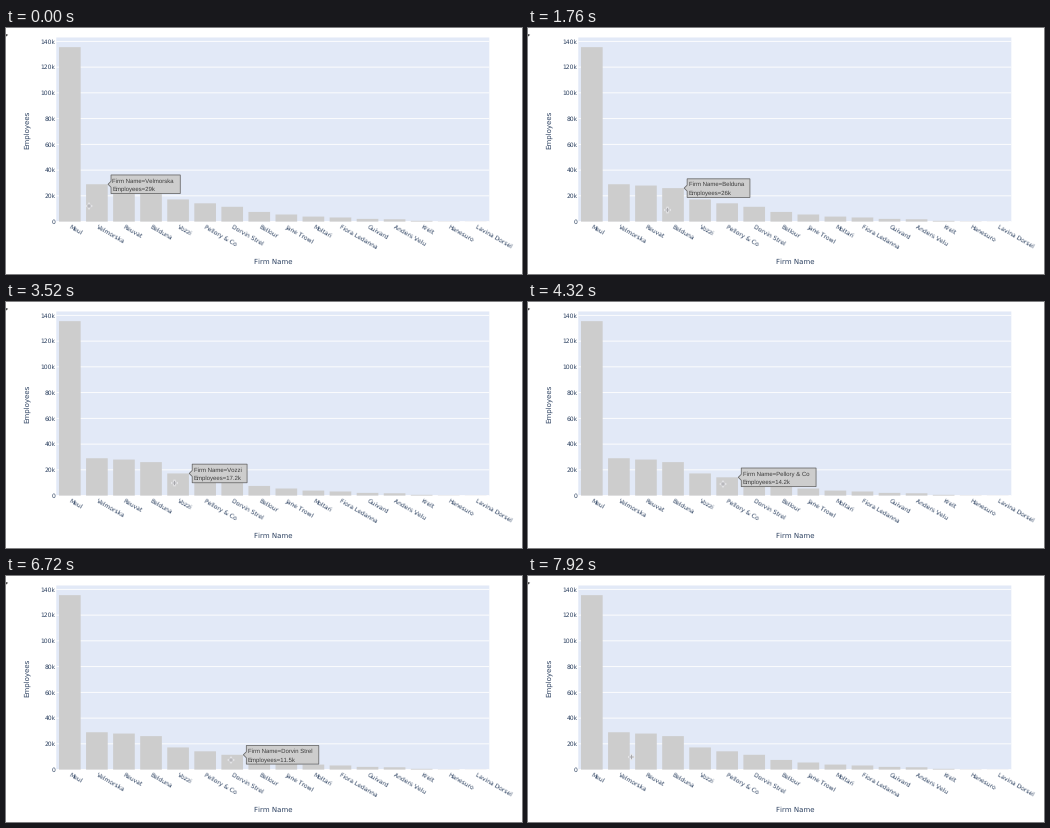
A matplotlib script that plays this animation: 516 by 246 pixels, repeating every 8 s.

```python
import matplotlib.pyplot as plt
from matplotlib.animation import FuncAnimation
from matplotlib.patches import Polygon, Rectangle
from matplotlib.textpath import TextPath

plt.rcParams["text.hinting"] = "none"
plt.rcParams["text.hinting_factor"] = 1

W, H, DPI = 516, 246, 100
FRAMES, STEP = 100, 80
PX = 72 / DPI
LEFT, RIGHT, TOP, BASE = 50.3, 483.3, 9.5, 193.6
PER_K = 25.75 / 20
INK, GREY = "#2a3f5f", "#cdcdcd"

FIRMS = [
    ("Meul", 135.5), ("Velmorska", 29), ("Reuvat", 28), ("Belduna", 26),
    ("Vozzi", 17.2), ("Pellory & Co", 14.2), ("Dorvin Strel", 11.5),
    ("Bellour", 7.5), ("Jane Trowl", 5.5), ("Moltari", 3.9),
    ("Fiora Ledanna", 3.2), ("Guivard", 2.1), ("Anders Velu", 1.8),
    ("Krelt", 0.6), ("Hanesuro", 0.2), ("Lavina Dorsel", 0.1),
]
SLOT = (RIGHT - LEFT) / len(FIRMS)
BAR = 0.8 * SLOT

# Pointer stops: time in ms, x, y
STOPS = [
    (0, 83, 178), (320, 90, 181), (400, 90, 181), (800, 114.5, 180),
    (880, 114.5, 180), (1040, 117.3, 180), (1280, 117.3, 180),
    (1760, 139.5, 182), (1920, 139.5, 182), (2480, 160, 180.5),
    (2640, 168.5, 181), (3840, 168.5, 181), (4320, 195, 182),
    (5440, 195, 182), (5680, 212, 182), (6080, 225, 184),
    (7200, 225, 184), (7920, 103.5, 181),
]

fig = plt.figure(figsize=(W / DPI, H / DPI), dpi=DPI, facecolor="white")
ax = fig.add_axes([0, 0, 1, 1])
ax.set_xlim(0, W)
ax.set_ylim(H, 0)
ax.axis("off")


def label(x, y, text, size, color=INK, family="DejaVu Sans", **kw):
    return ax.text(x, y, text, fontsize=size * PX, color=color,
                   family=family, va="baseline", **kw)


def box(x, y, w, h, color, zorder):
    ax.add_patch(Rectangle((x, y), w, h, fc=color, lw=0, zorder=zorder,
                           snap=False))


def stroke(xs, ys, color, width, **kw):
    return ax.plot(xs, ys, color=color, lw=width * PX, snap=False,
                   solid_capstyle="butt", **kw)[0]


def text_width(text, size):
    path = TextPath((0, 0), text, size=size, prop={"family": "Liberation Sans"})
    return path.get_extents().x1


def bar_left(i):
    return LEFT + SLOT * i + (SLOT - BAR) / 2


def draw_chart():
    box(LEFT, TOP, RIGHT - LEFT, BASE - TOP, "#e2e9f7", 0)
    for k in range(0, 141, 20):
        y = BASE - k * PER_K
        stroke([LEFT, RIGHT], [y, y], "white", 0.9, zorder=1)
        label(49.6, y + 2.2, f"{k}k" if k else "0", 6, ha="right")
    for i, (name, value) in enumerate(FIRMS):
        h = value * PER_K
        box(bar_left(i), BASE - h, BAR, h, GREY, 2)
        label(LEFT + SLOT * (i + 0.5) - 1.2, 199.5, name, 6,
              rotation=-30, rotation_mode="anchor")
    label((LEFT + RIGHT) / 2, 236, "Firm Name", 7, ha="center")
    label(22.6, (TOP + BASE) / 2, "Employees", 7, rotation=90,
          rotation_mode="anchor", ha="center")
    ax.add_patch(Polygon([(0, 6), (2.2, 6.8), (0, 8.6)], fc="#444444", lw=0))


draw_chart()
tip = Polygon([(0, 0)] * 3, fc=GREY, ec="#666666", lw=0.8 * PX, zorder=5,
              snap=False)
ax.add_patch(tip)
lines = [label(0, 0, "", 6.5, "#3c3c3c", "Liberation Sans", zorder=6)
         for _ in range(2)]
halo = [stroke([], [], "#e9e9ec", 2.2, zorder=8) for _ in range(2)]
cross = [stroke([], [], "#a4a4a8", 0.9, zorder=9) for _ in range(2)]


def pointer(t):
    for (t0, x0, y0), (t1, x1, y1) in zip(STOPS, STOPS[1:]):
        if t <= t1:
            u = (t - t0) / (t1 - t0)
            u = u * u * (3 - 2 * u)
            return x0 + (x1 - x0) * u, y0 + (y1 - y0) * u
    return STOPS[-1][1:]


def hovered(x, y):
    i = int((x - LEFT) // SLOT)
    inside = bar_left(i) <= x <= bar_left(i) + BAR
    return i if inside and y >= BASE - FIRMS[i][1] * PER_K else None


def show_tip(i):
    for artist in (tip, *lines):
        artist.set_visible(i is not None)
    if i is None:
        return
    name, value = FIRMS[i]
    texts = f"Firm Name={name}", f"Employees={value:g}k"
    y = BASE - value * PER_K
    x = bar_left(i) + BAR + 3.3
    right = x + max(text_width(s, 6.5) for s in texts) + 3
    tip.set_xy([(x - 3, y), (x, y - 3), (x, y - 9.3), (right, y - 9.3),
                (right, y + 9.3), (x, y + 9.3), (x, y + 3)])
    for line, text, dy in zip(lines, texts, (-1.7, 6.6)):
        line.set_text(text)
        line.set_position((x + 1.4, y + dy))


def update(frame):
    x, y = pointer(frame * STEP)
    show_tip(hovered(x, y))
    for pair, r in ((halo, 3.3), (cross, 2.2)):
        pair[0].set_data([x - r, x + r], [y, y])
        pair[1].set_data([x, x], [y - r, y + r])
    return [tip, *lines, *halo, *cross]


anim = FuncAnimation(fig, update, frames=FRAMES, interval=STEP,
                     repeat=True, repeat_delay=0, blit=False)
plt.show()
```
